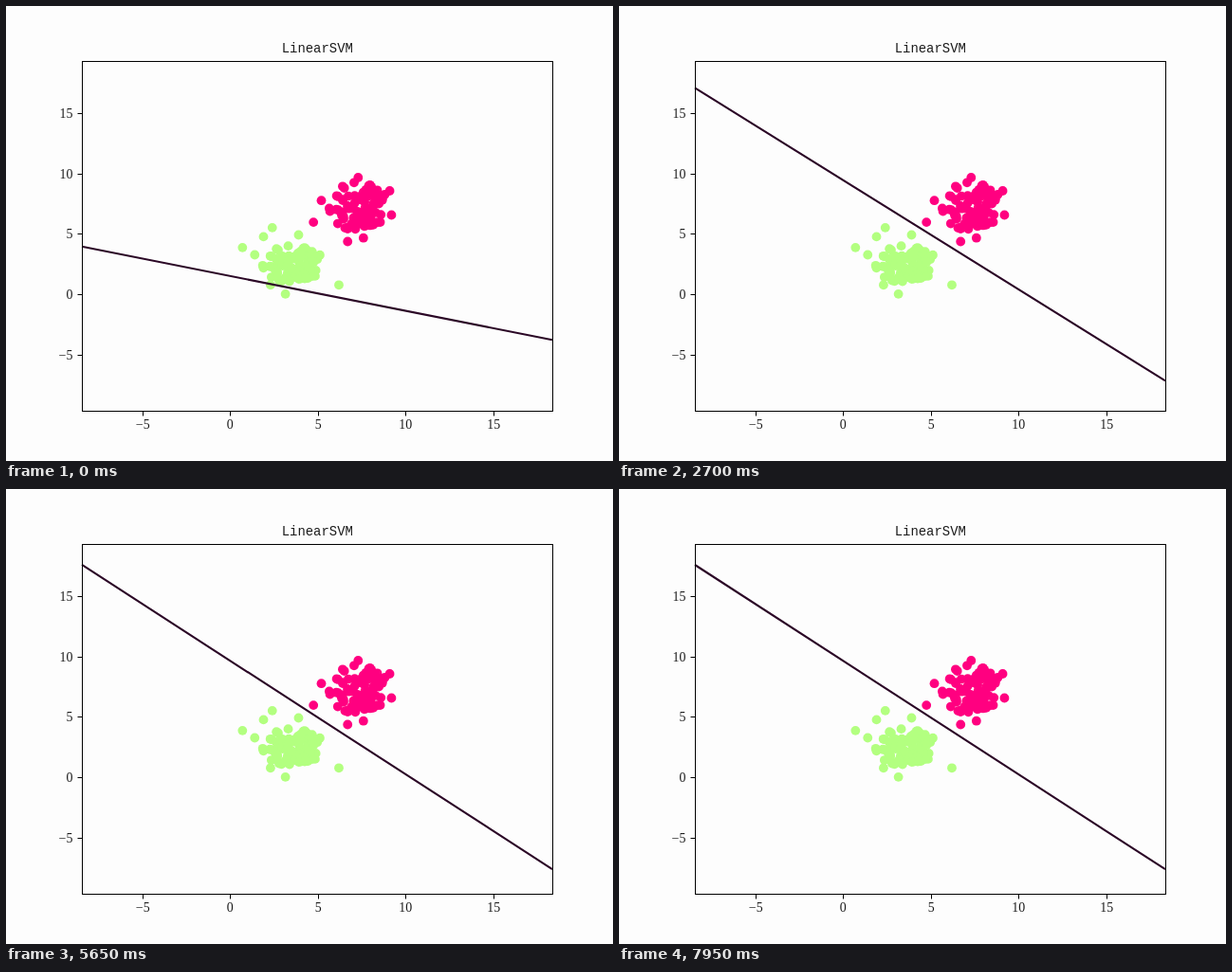
An HTML page that plays this animation: 640x480 px, repeating every 8000 ms.

```html
<!DOCTYPE html>
<html lang="en">
<head>
<meta charset="utf-8">
<title>LinearSVM</title>
<style>
  html, body { margin: 0; width: 100%; height: 100%; overflow: hidden; background: #fdfdfd; }
  svg { display: block; width: 640px; height: 480px; }
  text { font: 13.9px "Liberation Serif", serif; fill: #1c1c1c; }
  .title { font-family: "Liberation Mono", monospace; }
  .axes { fill: none; stroke: #000; stroke-width: 1; }
  #boundary { stroke: #2b0826; stroke-width: 2.1; }
</style>
</head>
<body>
<svg viewBox="0 0 640 480">
  <g id="points"></g>
  <line id="boundary" x1="80" x2="576"/>
  <g id="ticks"></g>
  <rect class="axes" x="80.5" y="58.5" width="496" height="369"/>
  <text class="title" x="328.3" y="49" text-anchor="middle">LinearSVM</text>
</svg>
<script>
const LOOP = 8000, STEP = 50;
const $ = id => document.getElementById(id);

function add(parent, tag, attrs, text = '') {
  const node = document.createElementNS('http://www.w3.org/2000/svg', tag);
  for (const key in attrs) node.setAttribute(key, attrs[key]);
  node.textContent = text;
  parent.append(node);
}

// Seeded random number from 0 to 1
function random(seed) {
  const n = Math.sin(seed * 127.1 + 11.7) * 43758.5453;
  return n - Math.floor(n);
}

const toX = v => 236.4 + v * 18.48;
const toY = v => 304 - v * 12.73;

for (let v = -5; v <= 15; v += 5) {
  const label = String(v).replace('-', '\u2212');
  const x = Math.round(toX(v)) + .5, y = Math.round(toY(v)) + .5;
  add($('ticks'), 'path', { class: 'axes', d: `M${x} 428v4.5M80 ${y}h-4.5` });
  add($('ticks'), 'text', { x: x - .3, y: 446, 'text-anchor': 'middle' }, label);
  add($('ticks'), 'text', { x: 70.4, y: y + 4.5, 'text-anchor': 'end' }, label);
}

// Each cluster is a random elliptical blob with a few outliers, in axis units.
const clusters = [
  { color: '#ff0080', center: [7.3, 7.4], radius: [1.7, 2.1],
    outliers: [[7.3, 9.7], [9.1, 8.6], [9.2, 6.6], [7.6, 4.7], [6.7, 4.4], [4.75, 6], [5.2, 7.8]] },
  { color: '#b3ff80', center: [3.55, 2.6], radius: [1.75, 1.6],
    outliers: [[.7, 3.9], [1.4, 3.3], [1.9, 4.8], [2.4, 5.55], [3.9, 4.95], [6.2, .8], [3.15, .05], [2.3, .8]] }
];

function blob([cx, cy], [rx, ry]) {
  return Array.from({ length: 90 }, (_, i) => {
    const r = random(i) ** .55, a = 2 * Math.PI * random(i + 500);
    return [cx + rx * r * Math.cos(a), cy + ry * r * Math.sin(a)];
  });
}

for (const { color, center, radius, outliers } of clusters)
  for (const [x, y] of [...blob(center, radius), ...outliers])
    add($('points'), 'circle', { cx: toX(x), cy: toY(y) + .5, r: 4.9, fill: color });

// Both ends settle exponentially; training noise grows as they do.
const decay = (t, scale, power) => Math.exp(-((t / scale) ** power));

function endsAt(t) {
  const left = decay(t, 900, 1.1), right = decay(t, 1500, 1.3);
  const noise = (random(t / STEP) - .5) * 2 * (1 - left);
  return [79.5 + 174.3 * left - noise, 401.5 - 49.3 * right + noise * .6];
}

const start = performance.now();
function draw() {
  const t = Math.floor((performance.now() - start) % LOOP / STEP) * STEP;
  const [left, right] = endsAt(t);
  $('boundary').setAttribute('y1', left);
  $('boundary').setAttribute('y2', right);
  requestAnimationFrame(draw);
}
draw();
</script>
</body>
</html>
```
